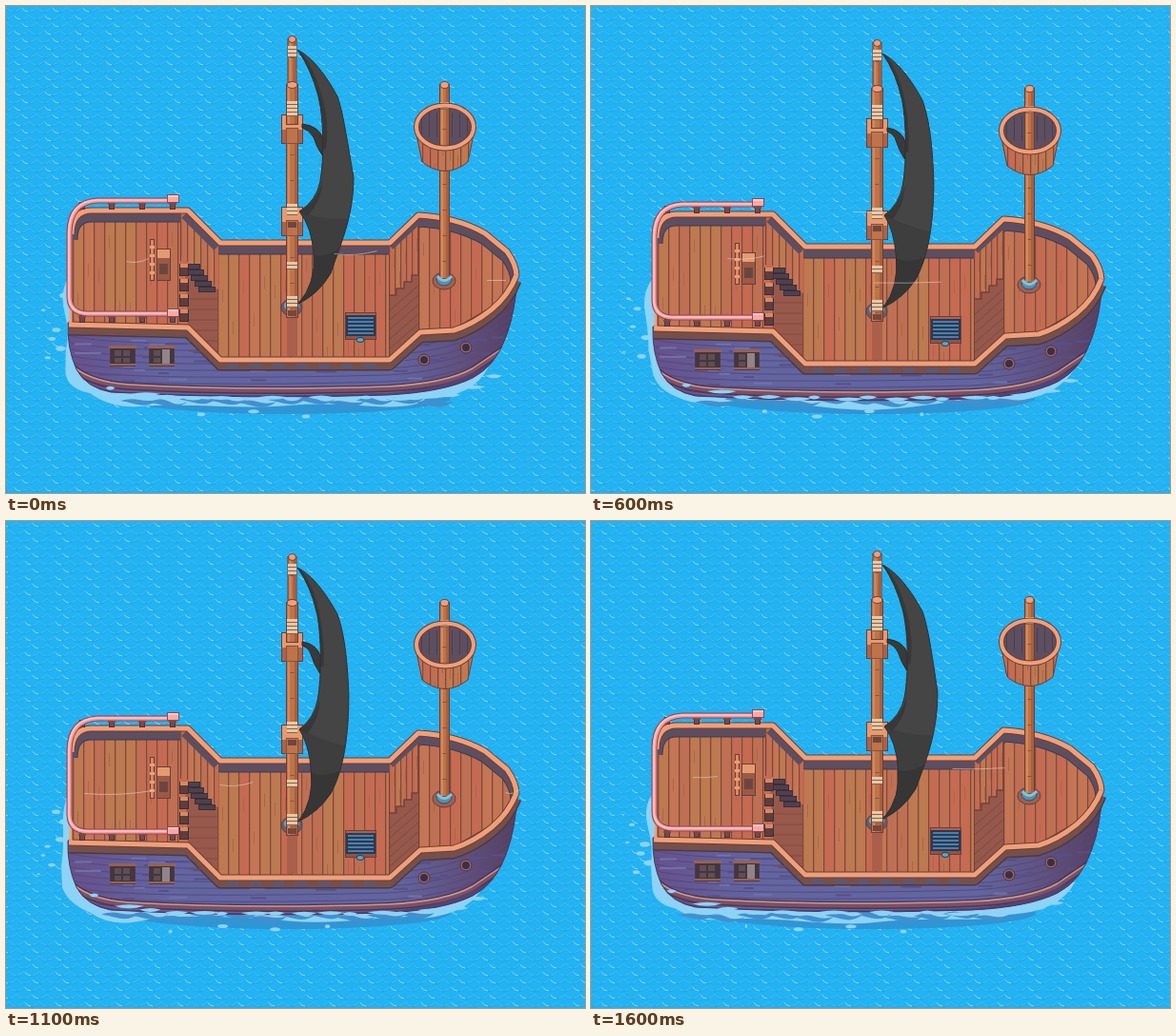
Write an HTML page with a canvas that moves like this. It is 608 by 512 pixels and loops after 1700 ms.

```html
<!DOCTYPE html>
<html lang="en">
<head>
<meta charset="utf-8">
<title>Ship at sea</title>
<style>
html, body { margin: 0; width: 100%; height: 100%; overflow: hidden; background: #23b2f2; }
canvas { display: block; width: 608px; height: 512px; }
</style>
</head>
<body>
<canvas id="stage" width="608" height="512"></canvas>
<script>
const W = 608, H = 512, STEPS = 17, STEP_MS = 100;
const TAU = Math.PI * 2;
const stage = document.getElementById('stage').getContext('2d');
const LINE = '#6b3d3a', RIM = '#f0a078', DARK = '#5d4f60', FOAM = '#8dd3f7';
const PLANKS = ['#c47654', '#bd7a50', '#c56b52', '#bf7052'];

function layer(w, h) {
  const c = document.createElement('canvas');
  c.width = w;
  c.height = h;
  return c.getContext('2d');
}

function fill(g, d, color) {
  g.fillStyle = color;
  g.fill(new Path2D(d));
}

function stroke(g, d, color, width = 1) {
  g.strokeStyle = color;
  g.lineWidth = width;
  g.stroke(new Path2D(d));
}

function rect(g, x, y, w, h, color, edge) {
  if (edge) {
    g.fillStyle = edge;
    g.fillRect(x - 1, y - 1, w + 2, h + 2);
  }
  g.fillStyle = color;
  g.fillRect(x, y, w, h);
}

function oval(g, x, y, rx, ry, color, edge, width = 1) {
  g.beginPath();
  g.ellipse(x, y, rx, ry, 0, 0, TAU);
  if (color) { g.fillStyle = color; g.fill(); }
  if (edge) { g.strokeStyle = edge; g.lineWidth = width; g.stroke(); }
}

function clipped(g, d, draw) {
  g.save();
  g.clip(new Path2D(d));
  draw();
  g.restore();
}

const hash = n => {
  const s = Math.sin(n * 12.9898) * 43758.5453;
  return s - Math.floor(s);
};

// Vertical boards with dark seams and a few scratches
function boards(g, x0, x1, y0, y1, step = 11) {
  for (let x = x0, i = 0; x < x1; x += step, i++) {
    rect(g, x, y0, step, y1 - y0, PLANKS[Math.floor(hash(x + i) * 4)]);
    rect(g, x, y0, 1, y1 - y0, '#7d4a40');
    rect(g, x + 1, y0, 1, y1 - y0, '#b0664c');
    rect(g, x + 5, y0 + hash(x + 7) * (y1 - y0), 1, 14, '#ad654a');
  }
}

function ropes(g, x, y, n, w = 10) {
  for (let i = 0; i < n; i++) {
    rect(g, x - w / 2, y + i * 4, w, 3, '#e5c9a6');
    rect(g, x - w / 2, y + i * 4 + 3, w, 1, '#8a5f4e');
  }
}

function pole(g, x, y0, y1, w) {
  rect(g, x - w / 2, y0 + 3, w, y1 - y0 - 3, '#bd744a', LINE);
  rect(g, x - w / 2 + 1, y0 + 3, 2, y1 - y0 - 3, '#d48a59');
  rect(g, x + w / 2 - 3, y0 + 3, 3, y1 - y0 - 3, '#a5603f');
  for (let y = y0 + 22; y < y1 - 8; y += 27) rect(g, x - 2, y, 4, 1, '#8d503b');
  oval(g, x, y0 + 3, w / 2, 3.5, RIM, LINE);
}

const HULL = 'M65 333L190 338L225 372H403L435 345L470 340L510 318L537 285Q535 320 526 345' +
  'Q515 378 490 391Q460 406 400 409Q250 414 110 406Q84 401 74 382Q64 360 65 333Z';
const DECK = 'M70 333V232Q72 217 90 217H190L224 251H404L434 222Q475 223 503 241L525 260' +
  'Q535 274 535 284Q525 306 508 317L470 339L434 342L403 371H224L191 337Z';
const BACK = 'M69 240Q69 215 90 215H191L225 249H403L433 220Q473 222 503 239L526 258Q536 272 536 284';
const FRONT = 'M66 335L191 338L225 372H403L435 343L470 341Q490 335 510 319Q528 304 536 283';
const RAIL = 'M175 204.5H96Q67 206 66.5 238V306Q67 323 86 323.5H176';

function drawHull(g) {
  const side = g.createLinearGradient(64, 0, 538, 0);
  side.addColorStop(0, '#67508a');
  side.addColorStop(.22, '#6365a0');
  side.addColorStop(.72, '#6365a0');
  side.addColorStop(.9, '#5f4d78');
  side.addColorStop(1, '#563e5c');
  g.fillStyle = side;
  g.fill(new Path2D(HULL));
  clipped(g, HULL, () => {
    for (let i = 0; i < 9; i++) {
      const y = 342 + i * 7;
      stroke(g, `M60 ${y - 4}Q90 ${y + 5} 190 ${y + 6}T400 ${y + 4}Q490 ${y} 540 ${y - 44}`, '#524a80');
    }
    for (let i = 0; i < 60; i++) {
      const x = 72 + hash(i) * 440, y = 346 + hash(i + 60) * 50;
      rect(g, x, y, 6 + hash(i + 9) * 22, 2, i % 3 ? '#574f88' : '#7072aa');
    }
    const belt = 'M64 374Q82 397 130 400Q250 407 400 402Q462 399 490 383L530 356';
    stroke(g, belt, '#4d3551', 8);
    stroke(g, belt, '#7d5066', 5);
    g.translate(0, -2);
    stroke(g, belt, '#c69a92', 1.5);
    g.translate(0, 2);
    stroke(g, 'M70 390Q90 408 130 409Q250 415 400 410Q470 406 515 375', '#514477', 6);
  });
  stroke(g, HULL, '#483758');
}

function drawWindow(g, x, curtain) {
  rect(g, x, 358, 25, 20, '#423642', '#553941');
  rect(g, x - 2, 357, 29, 3, '#98624f');
  rect(g, x - 1, 376, 27, 2, '#98624f');
  for (const dx of [4, 13]) {
    rect(g, x + dx, 362, 7, 6, '#5f4e52');
    rect(g, x + dx, 370, 7, 5, '#5f4e52');
  }
  if (curtain) rect(g, x + 13, 361, 8, 15, '#908488');
}

function drawStairs(g) {
  // Port flight
  clipped(g, 'M183 217H190L223 251V298L183 262Z', () => {
    boards(g, 183, 223, 217, 300, 7);
    stroke(g, 'M190 217L224 251', DARK, 16);
  });
  fill(g, 'M188 272L222 298V371L191 338Z', '#98594b');
  for (let y = 308; y < 366; y += 11) stroke(g, `M192 ${y}H222`, '#824a43');
  for (let i = 0; i < 5; i++) rect(g, 187 + i * 4, 272 + i * 6, 16, 4, '#51404b', '#382f3c');
  rect(g, 183, 228, 1, 40, '#6d4540');
  for (let i = 0; i < 4; i++) {
    const y = 272 + i * 16;
    rect(g, 183, y, 8, 11, '#5f3d3d', '#3f2c34');
    rect(g, 183, y - 1, 8, 4, '#d78964');
  }
  // Starboard flight
  clipped(g, 'M402 252L434 222V282L402 309Z', () => {
    boards(g, 402, 436, 222, 312, 6);
    stroke(g, 'M402 251L434 221', DARK, 13);
  });
  fill(g, 'M402 311V304H410V297H418V290H426V283H434V342L402 371Z', '#95584b');
  for (let y = 321; y < 371; y += 10) stroke(g, `M402 ${y}L434 ${y - 28}`, '#7c4943');
  stroke(g, 'M402 304H410V297H418V290H426V283H434', '#734139', 1.5);
  stroke(g, 'M402.5 262V371M433.5 230V342', '#734139');
}

function drawFittings(g) {
  // Helm
  rect(g, 159, 256, 13, 32, '#9a5a45', LINE);
  rect(g, 159, 256, 13, 9, '#e59a70');
  rect(g, 161, 271, 9, 11, '#6d4540');
  rect(g, 152, 246, 3, 42, '#d68a60', LINE);
  for (let y = 252; y < 288; y += 9) rect(g, 151, y, 5, 3, '#e8a077');
  // Hatch
  rect(g, 357, 323, 31, 27, '#2c3951', LINE);
  rect(g, 357, 323, 31, 2, '#a8634c');
  rect(g, 357, 347, 31, 3, '#8d5548');
  for (let y = 327; y < 346; y += 4) rect(g, 359, y, 27, 2, '#4a80ab');
  oval(g, 372, 351, 4, 2.5, '#57a8cb', '#2c3951');
}

function drawRailing(g) {
  for (const y of [207, 326]) {
    for (const x of [80, 111, 143, 175]) {
      rect(g, x - 2, y, 4, 6, '#784947', '#4d333b');
      rect(g, x - 4, y, 8, 2, '#784947');
    }
  }
  stroke(g, RAIL, '#944553', 6);
  stroke(g, RAIL, '#ee9ca0', 4);
  g.translate(-.5, -.5);
  stroke(g, RAIL, '#ffc9c4', 1.5);
  g.translate(.5, .5);
  for (const y of [199, 319]) {
    rect(g, 170, y, 11, 7, '#f5aaa6', '#944553');
    rect(g, 170, y, 11, 2, '#ffc9c4');
  }
}

function drawNest(g) {
  pole(g, 460.5, 165, 286, 9);
  oval(g, 461, 127, 31, 24, DARK);
  for (let x = 436; x < 488; x += 8) rect(g, x, 112, 1, 26, '#493f50');
  pole(g, 460.5, 80, 152, 9);
  ropes(g, 460.5, 101, 2, 9);
  const body = 'M430 130L437 164Q461 183 485 164L492 130Q484 150 461 150Q438 150 430 130Z';
  clipped(g, body, () => boards(g, 429, 494, 128, 178, 8));
  stroke(g, body, LINE);
  oval(g, 461, 127, 30, 22.5, null, LINE, 6);
  oval(g, 461, 127, 30, 22.5, null, RIM, 4);
}

function drawMainMast(g) {
  rect(g, 295, 328, 11, 40, '#aa5f4a');
  oval(g, 300, 317, 11, 9, '#65606e', LINE);
  oval(g, 300, 315, 8, 6, '#74a6bd');
  pole(g, 300.5, 32, 86, 8);
  pole(g, 300.5, 80, 327, 11);
  for (const y of [115, 212]) {
    rect(g, 290, y, 21, 29, '#a9644b', LINE);
    rect(g, 290, y, 21, 15, '#e49a71');
    rect(g, 295, y + 14, 11, 15, '#bd744a', '#85503f');
  }
  pole(g, 300.5, 80, 124, 11);
  rect(g, 296, 227, 9, 6, '#704640');
  ropes(g, 300.5, 42, 3, 9);
  ropes(g, 300.5, 100, 4, 11);
  ropes(g, 300.5, 208, 3, 11);
  ropes(g, 300.5, 269, 2, 11);
  ropes(g, 300.5, 305, 3, 11);
  rect(g, 296, 320, 9, 6, '#76473d');
}

function makeShip() {
  const g = layer(W, H);
  g.lineJoin = 'round';
  drawHull(g);
  g.translate(0, 6);
  stroke(g, FRONT, '#4d3a45', 11);
  stroke(g, FRONT, '#75504b', 8);
  g.translate(0, -6);
  for (let x = 232; x < 396; x += 24) rect(g, x, 376, 12, 5, '#5c5873');
  fill(g, DECK, PLANKS[3]);
  stroke(g, DECK, LINE, 4);
  clipped(g, DECK, () => {
    boards(g, 70, 184, 215, 340);
    boards(g, 222, 403, 249, 372);
    boards(g, 433, 540, 220, 345);
    g.translate(0, 6);
    stroke(g, BACK, '#433a4b', 13);
    stroke(g, BACK, DARK, 11);
    g.translate(0, -6);
  });
  drawStairs(g);
  for (const d of [BACK, FRONT]) {
    stroke(g, d, LINE, 7);
    stroke(g, d, RIM, 5);
  }
  stroke(g, 'M68 238V334', RIM, 3);
  drawWindow(g, 110, false);
  drawWindow(g, 151, true);
  for (const [x, y] of [[439, 372], [483, 359]]) {
    oval(g, x, y, 6, 6, '#9c6660', '#4d3548');
    oval(g, x, y, 4, 4, '#392f47');
  }
  drawFittings(g);
  drawRailing(g);
  oval(g, 460, 289, 12, 9, '#9b6152', LINE);
  oval(g, 460, 287, 8, 7, '#5a8eaa', '#3b4c66');
  drawNest(g);
  stroke(g, 'M453 284Q460 293 468 284', '#7ac7df', 3);
  drawMainMast(g);
  return g.canvas;
}

// Overlapping scales with broken bright crests
function makeWater() {
  const g = layer(32, 32);
  rect(g, 0, 0, 32, 32, '#23b2f2');
  for (let row = 0; row < 4; row++) {
    const y = row * 8 + 1.5;
    for (let k = -1; k < 3; k++) {
      const x = k * 16 + (row % 2) * 8;
      stroke(g, `M${x} ${y + 1}q8 9 16 0`, '#1ea8ea');
      stroke(g, `M${x} ${y}q3 4 7 4.5m3 -.5q4 -1 6 -4`, '#42c0f5');
      if ((row + k) % 2) stroke(g, `M${x + 1} ${y + 1}q2 3 6 3.5`, '#86daf9');
    }
  }
  return stage.createPattern(g.canvas, 'repeat');
}

const ship = makeShip();
const water = makeWater();
const bob = [0, 1, 2, 3, 4, 4, 4, 4, 4, 4, 3, 3, 2, 1, 1, 0, 0];

function drawWater(p) {
  const shift = Math.round(p * 32);
  stage.save();
  stage.translate(-shift, 0);
  stage.fillStyle = water;
  stage.fillRect(0, 0, W + 32, H);
  stage.restore();
}

function drawWake(p) {
  const a = TAU * p;
  const w = n => Math.sin(a * 2 + n) * 3;
  const edge = `M66 285Q${56 + w(0)} 300 ${59 + w(1)} 322T${60 + w(2)} 362L${62 + w(3)} 385` +
    `Q${66 + w(4)} 402 88 ${410 + w(5)}Q110 ${424 + w(6)} 140 ${419 + w(7)}T220 ${418 + w(2)}` +
    `T300 ${422 + w(4)}T380 ${418 + w(1)}T440 ${416 + w(5)}Q490 412 ${506 + w(3)} 380L470 375H90L75 340Z`;
  oval(stage, 295, 412, 172, 17, '#2f95d5');
  fill(stage, edge, FOAM);
  for (let i = 0; i < 11; i++) {
    const x = 120 + i * 31 - p * 31, y = 415 + Math.sin(i * 2 + a) * 2;
    const rise = 3 + hash(i % 5) * 4;
    fill(stage, `M${x} ${y}q10 ${-rise} 20 -1t20 0q-10 8 -22 5t-18 -4Z`, '#438fcd');
  }
  for (let i = 0; i < 7; i++) {
    const age = (p * 2 + i / 7) % 1;
    const x = 62 - age * 32, y = 298 + hash(i + 2) * 110 + age * 5;
    oval(stage, x, y, 5 * (1 - age) + 1, 2.5 * (1 - age) + .5, FOAM);
  }
  for (let i = 0; i < 4; i++) {
    const age = (p + i / 4) % 1;
    oval(stage, 370 - age * 220, 426 + hash(i) * 6, 6 * Math.sin(age * Math.PI), 2, FOAM);
  }
}

// Foam lapping over the foot of the hull
function drawSplash(p) {
  for (let i = 0; i < 16; i++) {
    const u = (i + 1 - p) / 16;
    const x = 78 + u * 425, len = 10 + Math.abs(Math.sin(i * 5)) * 22;
    const y = 412 - 24 * Math.pow(Math.abs(u * 2 - 1), 6) + Math.sin(i * 3 + TAU * p);
    fill(stage, `M${x} ${y}q${len / 2} -3 ${len} 0q${-len / 2} 5 ${-len} 0Z`, FOAM);
  }
}

function drawSail(p) {
  const k = Math.cos(TAU * p * 2);
  const bx = 361 + k * 4, n = 2 * k, low = 232 - k * 9;
  const body = `M306 46C322 54 336 73 348 95C354 112 ${358 - k} 135 ${bx} 180` +
    `C${bx} ${low} ${351 - k} ${low + 30} 341 ${283 - n}Q328 303 307 313` +
    `Q${324 + n} 291 ${321 + n} 260Q${319 + n} 232 308 216` +
    `Q${324 + n} 205 ${328 + n} 184C${332 + n} 160 ${332 + n} 120 ${327 + n / 2} 95Q320 65 306 46Z`;
  const flap = `M311 124Q${327 + n} 126 ${331 + n} 140L${330 + n} 157Q${324 + n} 148 ${321 + n} 138Q318 130 311 128Z`;
  fill(stage, flap, '#3a3a3a');
  stroke(stage, flap, '#2b2b2b');
  fill(stage, body, '#454545');
  clipped(stage, body, () => {
    fill(stage, `M306 214Q326 226 ${bx} ${low}L350 285L305 318Z`, '#3e3e3e');
    fill(stage, `M318 260Q336 270 ${bx} ${low + 20}L345 290L305 318Z`, '#363636');
    fill(stage, `M308 216Q${325 + n} 205 ${330 + n} 184Q${330 + n} 205 316 221Z`, '#383838');
    stroke(stage, `M306 46Q322 66 ${328 + n} 95T${332 + n} 150`, '#383838', 4);
  });
  stroke(stage, body, '#303030');
}

// Gusts: [step, centre x, y, length]
const gusts = [
  [[11, 532, 285, 15], [13, 503, 273, 37], [16, 407, 260, 55], [17, 367, 260, 45], [19, 288, 268, 47], [21, 224, 270, 48], [25, 101, 260, 28]],
  [[0, 515, 288, 20], [2, 505, 287, 70], [4, 422, 281, 65], [8, 243, 300, 75], [11, 118, 286, 72]],
  [[9, 300, 280, 20], [11, 242, 277, 35], [13, 167, 290, 65], [16, 120, 269, 26], [17, 138, 268, 23], [19, 141, 293, 28], [21, 107, 297, 15]],
  [[4, 341, 212, 32], [8, 240, 220, 30]]
];

function drawGusts(step) {
  for (const keys of gusts) {
    for (const s of [step, step + STEPS]) {
      const i = keys.findIndex((q, j) => j < keys.length - 1 && s >= q[0] && s <= keys[j + 1][0]);
      if (i < 0) continue;
      const a = keys[i], b = keys[i + 1], u = (s - a[0]) / (b[0] - a[0]);
      const [x, y, len] = [1, 2, 3].map(j => a[j] + (b[j] - a[j]) * u);
      const bend = Math.sin(s) * 3;
      stroke(stage, `M${x - len / 2} ${y + .5}q${len / 2} ${-bend} ${len} ${bend}`, 'rgba(235,222,214,.5)');
    }
  }
}

function draw(step) {
  const p = step / STEPS;
  drawWater(p);
  drawWake(p);
  stage.save();
  stage.translate(0, bob[step]);
  stage.drawImage(ship, 0, 0);
  drawSail(p);
  stage.restore();
  drawSplash(p);
  drawGusts(step);
}

const start = performance.now();
let shown = -1;
function tick() {
  const step = Math.floor((performance.now() - start) / STEP_MS) % STEPS;
  if (step !== shown) draw(shown = step);
  requestAnimationFrame(tick);
}
tick();
</script>
</body>
</html>
```
